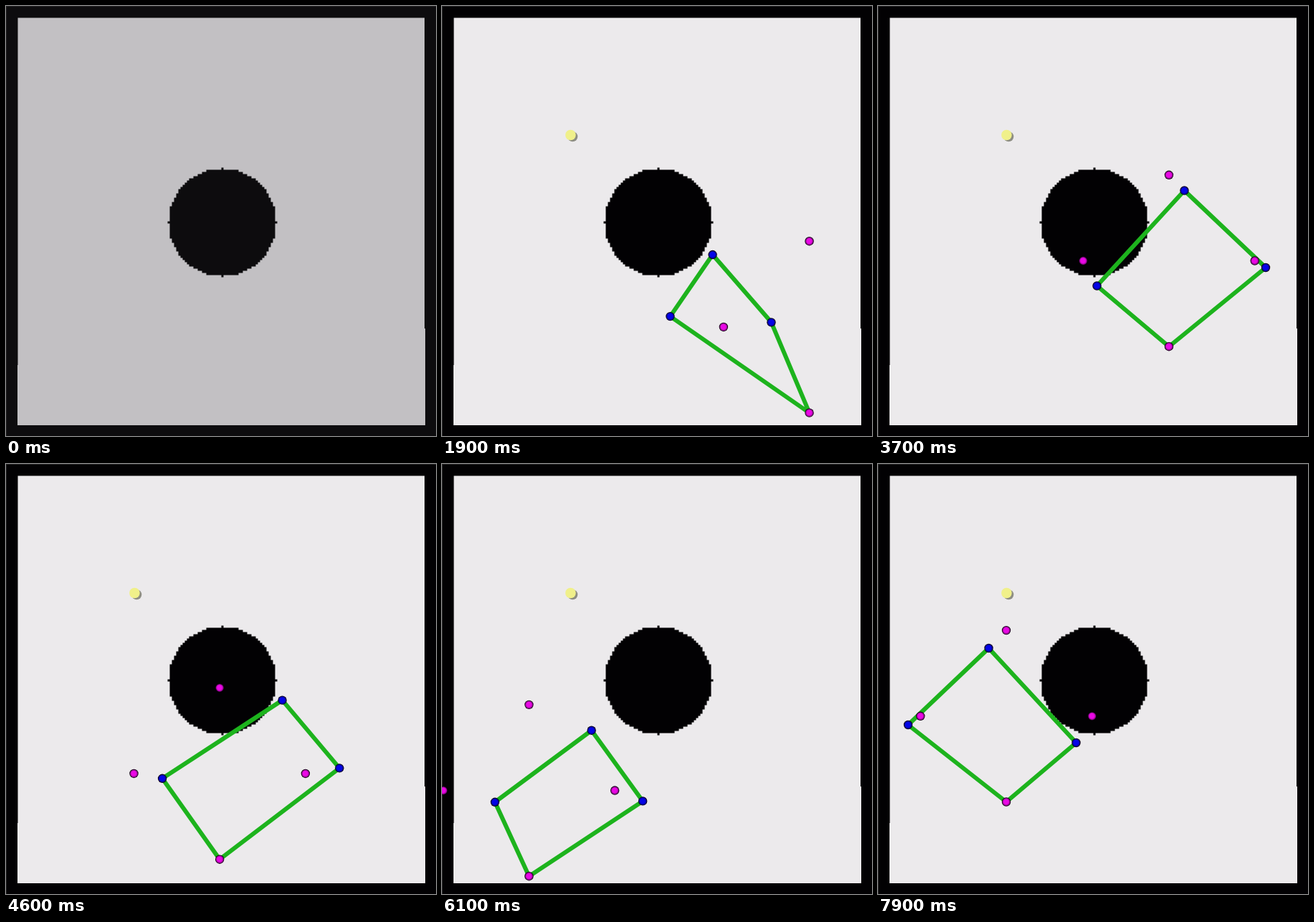
An HTML page with a canvas that plays this animation: 600x600 px, repeating every 8000 ms.

```html
<!DOCTYPE html>
<html lang="en">
<head>
<meta charset="utf-8">
<title>Formation control</title>
<style>
  html, body { margin: 0; width: 100%; height: 100%; overflow: hidden; background: #000; }
  canvas { display: block; width: 600px; height: 600px; }
</style>
</head>
<body>
<canvas id="stage" width="600" height="600"></canvas>
<script>
const ctx = document.getElementById('stage').getContext('2d');
const LOOP = 8000, STEP = 100;
const REACH = 119.7;                       // goal distance from the leader
const MID = 302, CELL = 3, CELLS = 25;     // obstacle grid
const CLEAR = 88, WALL = [22, 574];        // limits kept by the followers

// Key points as [time, x, y]
const leader = [
  [1000, 419, 439], [1800, 505, 453], [2700, 543, 376],
  [3700, 406, 355.5], [4500, 310, 427], [5500, 192.8, 453],
  [6300, 98, 452], [6800, 42, 420], [7900, 179, 351.8]
];
const upper = [
  [1000, 236, 369.5], [2700, 465, 316], [3700, 427.5, 257.5],
  [5500, 302, 391.5], [6800, 110.5, 320], [7900, 154.5, 257]
];
const left = [
  [1000, 210, 462.5], [2700, 386, 409], [3700, 305.5, 390.5],
  [5500, 131, 482], [6800, 25, 436.5], [7900, 42, 364]
];
const right = [
  [1000, 301.5, 477], [2700, 570.5, 409], [3700, 541, 365],
  [5500, 371.5, 482], [6800, 195.5, 434], [7900, 276.5, 389]
];

const clamp = (v, lo, hi) => Math.min(hi, Math.max(lo, v));

function slope(keys, i, k) {
  const a = keys[Math.max(i - 1, 0)], b = keys[Math.min(i + 1, keys.length - 1)];
  return (b[k] - a[k]) / (b[0] - a[0]);
}

// Smooth curve through the keys, straight before the first one
function along(keys, t) {
  if (t < keys[0][0]) {
    return [1, 2].map(k => keys[0][k] + slope(keys, 0, k) * (t - keys[0][0]));
  }
  let i = 0;
  while (i < keys.length - 2 && t >= keys[i + 1][0]) i++;
  const a = keys[i], b = keys[i + 1], h = b[0] - a[0];
  const u = (t - a[0]) / h, v = 1 - u;
  return [1, 2].map(k =>
    v * v * (1 + 2 * u) * a[k] + u * u * (3 - 2 * u) * b[k] +
    h * u * v * (v * slope(keys, i, k) - u * slope(keys, i + 1, k)));
}

// Followers stay inside the walls and go around the obstacle
function follow(keys, t) {
  const [x, y] = along(keys, t);
  const dx = x - MID, dy = y - MID;
  const push = Math.max(1, CLEAR / Math.hypot(dx, dy));
  return [clamp(MID + dx * push, ...WALL), MID + dy * push];
}

function disc(x, y, r, fill) {
  ctx.fillStyle = fill;
  ctx.beginPath();
  ctx.arc(x, y, r, 0, 2 * Math.PI);
  ctx.fill();
}

function ball([x, y], light, dark) {
  disc(x, y, 6.2, '#100214');
  const g = ctx.createRadialGradient(x - 0.5, y - 0.5, 0.5, x, y, 5.4);
  g.addColorStop(0, light);
  g.addColorStop(0.55, light);
  g.addColorStop(1, dark);
  disc(x, y, 5.4, g);
}

function drawArena(floor, wall) {
  ctx.fillStyle = wall;
  ctx.fillRect(0, 0, 600, 600);
  ctx.fillStyle = '#222123';
  ctx.fillRect(0, 0, 600, 1);
  ctx.fillRect(0, 0, 1, 600);
  ctx.fillStyle = floor;
  ctx.fillRect(16.5, 16.5, 567.5, 568.5);
  ctx.fillRect(16, 501, 1, 84);
  ctx.fillRect(584, 450, 1, 135);

  ctx.fillStyle = wall;
  ctx.beginPath();
  for (let j = -CELLS; j <= CELLS; j++) {
    const half = (Math.floor(Math.sqrt(CELLS * CELLS - j * j)) + 0.5) * CELL;
    ctx.rect(MID - half, MID + (j - 0.5) * CELL, 2 * half, CELL);
  }
  ctx.fill();
}

function drawAgents(t) {
  const [cx, cy] = along(leader, t);
  const goals = [[0, -1], [-1, 0], [1, 0], [0, 1]]
    .map(([x, y]) => [cx + x * REACH, cy + y * REACH]);
  const [a, b, c] = [upper, left, right].map(keys => follow(keys, t));

  disc(182.3, 182.3, 7, '#8e8e83');
  disc(179.4, 180, 7.3, '#f0f08a');

  ctx.strokeStyle = '#1db31d';
  ctx.lineWidth = 6;
  ctx.lineJoin = 'round';
  ctx.beginPath();
  [a, c, goals[3], b].forEach(p => ctx.lineTo(...p));
  ctx.closePath();
  ctx.stroke();

  goals.forEach(p => ball(p, '#ea08e6', '#7c0578'));
  [a, b, c].forEach(p => ball(p, '#0404e8', '#000080'));
}

function render(now) {
  const t = Math.floor((now % LOOP) / STEP) * STEP;
  if (t < 100) drawArena('#c2c0c3', '#0d0c0e');
  else if (t < 200) drawArena('#dad8da', '#060506');
  else drawArena('#eceaec', '#020103');
  if (t >= 200) drawAgents(t);
}

const start = performance.now();
function tick() {
  render(performance.now() - start);
  requestAnimationFrame(tick);
}
tick();
</script>
</body>
</html>
```
